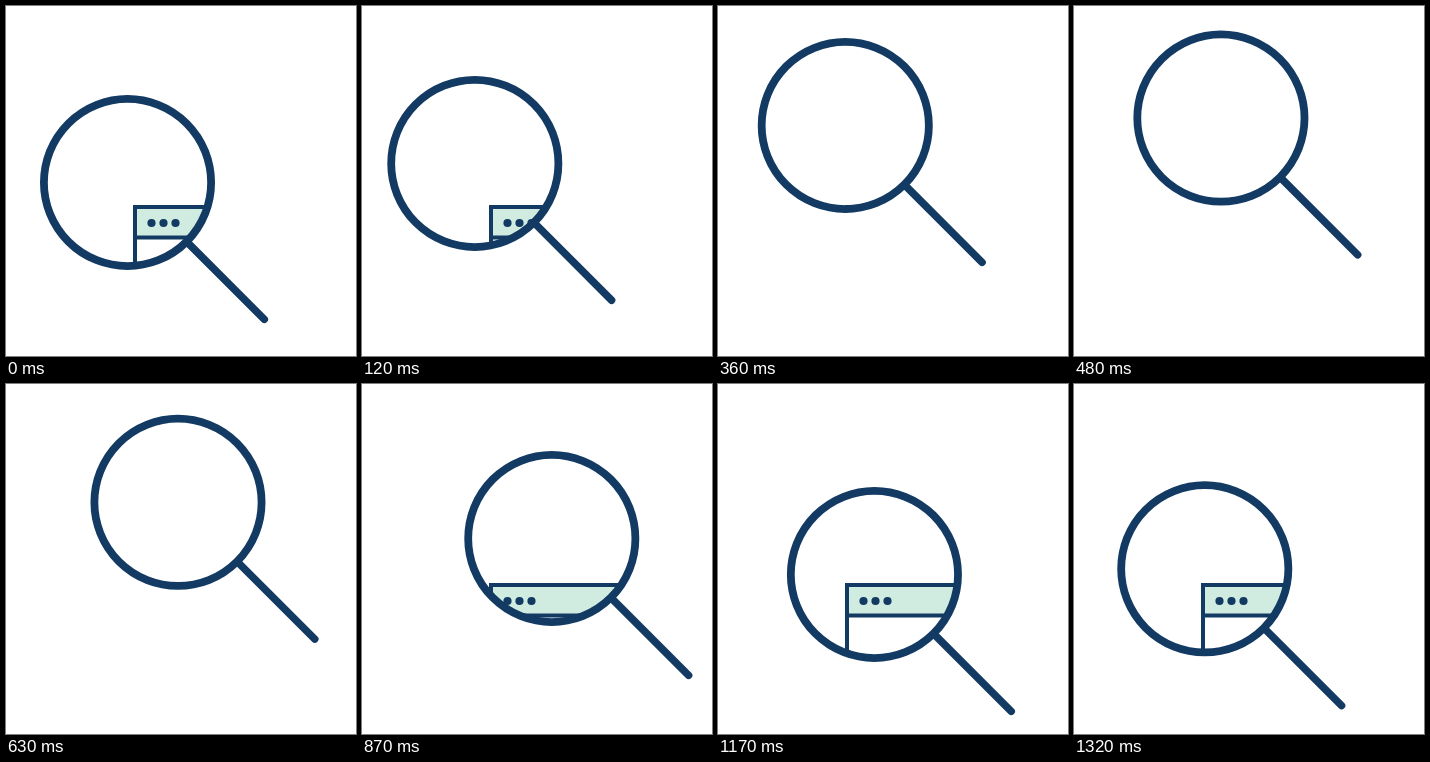
An HTML page that plays this animation: 350 px wide and 350 px high, repeating every 1.35 s.

```html
<!DOCTYPE html>
<html lang="en">
<head>
<meta charset="utf-8">
<title>Searching</title>
<style>
  html, body { margin: 0; width: 100%; height: 100%; overflow: hidden; background: #fff; }
  svg { display: block; width: 100%; height: 100%; }
</style>
</head>
<body>
<svg viewBox="0 0 350 350">
  <defs>
    <clipPath id="lens"><circle id="hole" r="82"/></clipPath>
  </defs>
  <g clip-path="url(#lens)" stroke="#123a63" stroke-width="4" fill="none">
    <rect x="129" y="201" width="180" height="30.5" fill="#d0ebe0"/>
    <path d="M129 201V320"/>
    <g fill="#123a63" stroke="none">
      <circle cx="145.5" cy="217" r="4.1"/>
      <circle cx="157.5" cy="217" r="4.1"/>
      <circle cx="169.5" cy="217" r="4.1"/>
    </g>
  </g>
  <g id="glass" fill="none" stroke="#123a63" stroke-width="7.8">
    <circle r="83.6"/>
    <path d="M60 60L136.8 136.8" stroke-width="7.5" stroke-linecap="round"/>
  </g>
</svg>
<script>
  const LOOP = 1350, STEP = 30;
  const CENTER = { x: 150.75, y: 151 };

  // Orbit: time in ms, angle in degrees, radius
  const orbit = [
    [0, 138.9, 38.8], [240, 201.8, 38.2], [360, 233.3, 39.3], [540, 279.9, 39.1],
    [630, 303, 39], [870, 365.1, 39.2], [1050, 410.8, 40.4], [1320, 480.6, 39.25]
  ];
  const hole = document.getElementById('hole');
  const glass = document.getElementById('glass');

  function orbitAt(t) {
    let i = 1;
    while (i < orbit.length - 1 && t > orbit[i][0]) i++;
    const a = orbit[i - 1], b = orbit[i];
    const k = (t - a[0]) / (b[0] - a[0]);
    const mix = n => a[n] + (b[n] - a[n]) * k;
    const angle = mix(1) * Math.PI / 180, radius = mix(2);
    return {
      x: CENTER.x + radius * Math.cos(angle),
      y: CENTER.y + radius * Math.sin(angle)
    };
  }

  function draw(ms) {
    const t = Math.floor((ms % LOOP) / STEP) * STEP;
    const p = orbitAt(t);
    hole.setAttribute('cx', p.x);
    hole.setAttribute('cy', p.y);
    glass.setAttribute('transform', `translate(${p.x} ${p.y})`);
  }

  let start = null;
  function tick(now) {
    if (start === null) start = now;
    draw(Math.max(0, now - start));
    requestAnimationFrame(tick);
  }
  draw(0);
  requestAnimationFrame(tick);
</script>
</body>
</html>
```
